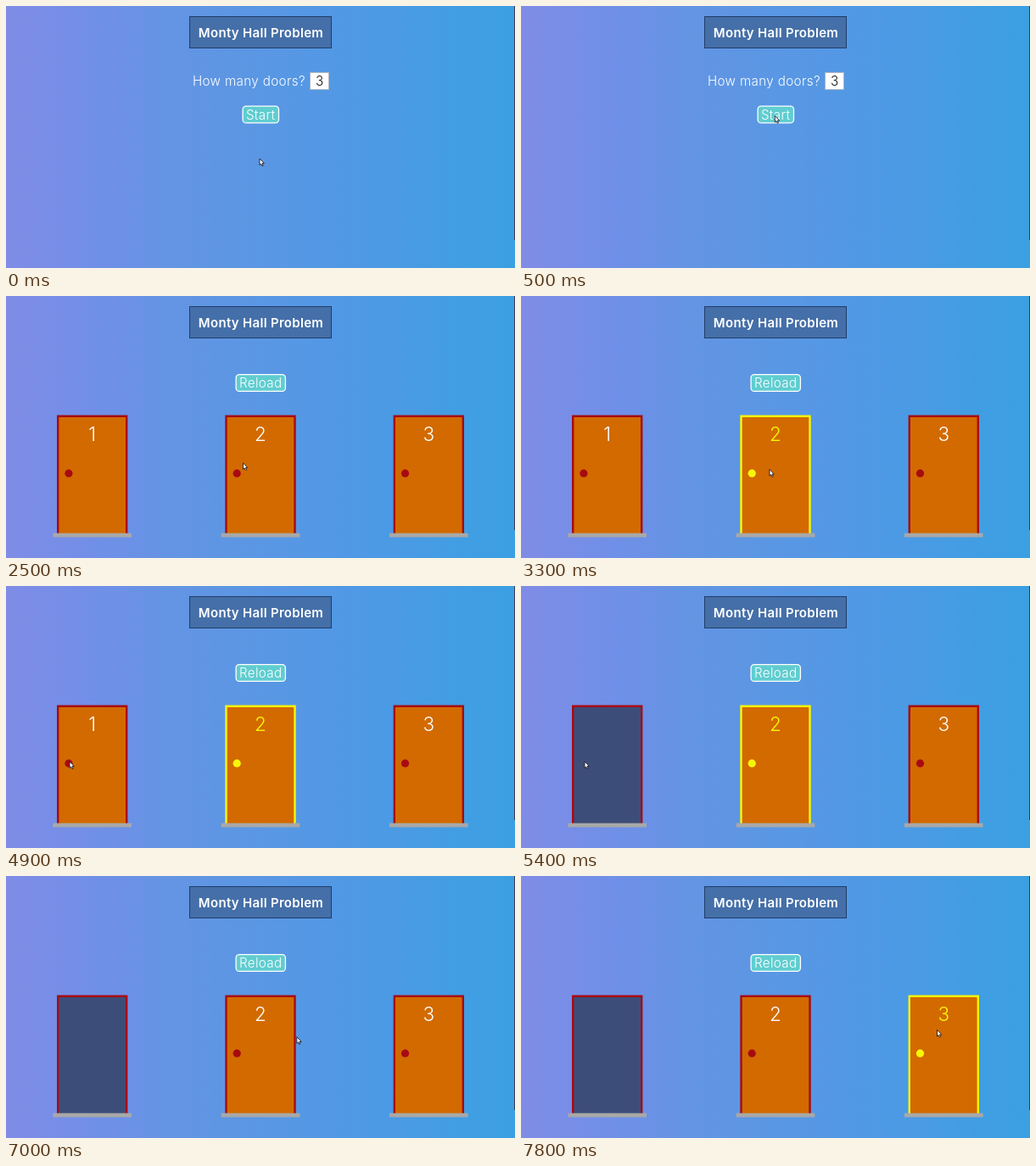
An HTML page that plays this animation: 600x309 px, repeating every 8 s.

```html
<!DOCTYPE html>
<html lang="en">
<head>
<meta charset="utf-8">
<title>Monty Hall Problem</title>
<style>
  html, body { margin: 0; width: 100%; height: 100%; overflow: hidden; }
  svg { display: block; width: 100vw; height: 100vh; }
  text { font: 300 15.2px Inter, sans-serif; letter-spacing: .35px; fill: #fff; text-anchor: middle; }
  .title { font-size: 15px; font-weight: 600; letter-spacing: .3px; }
  .button rect { fill: #60cdd0; stroke: #fff; stroke-width: 1.3; }
  .door { --accent: #a80a12; --ink: #fff; }
  .door.selected { --accent: #f8f808; --ink: #f8f808; }
  .panel { fill: #d26a00; stroke: var(--accent); stroke-width: 2.4; }
  .knob { fill: var(--accent); }
  .door text { font-size: 22.5px; letter-spacing: 0; fill: var(--ink); }
  .open .panel { fill: #3d4d79; }
  .open .knob, .open text { display: none; }
</style>
</head>
<body>
<svg viewBox="0 0 600 309" preserveAspectRatio="none">
  <defs>
    <linearGradient id="sky">
      <stop offset="0" stop-color="#808ce6"/>
      <stop offset=".17" stop-color="#718fe8"/>
      <stop offset=".35" stop-color="#6295e3"/>
      <stop offset=".7" stop-color="#4f99e5"/>
      <stop offset="1" stop-color="#3aa0e1"/>
    </linearGradient>
  </defs>
  <rect width="600" height="309" fill="url(#sky)"/>
  <rect x="599" width="1" height="276" fill="#3a3a58"/>
  <rect x="216.5" y="12.5" width="167" height="37" fill="#456fa8" stroke="#203d69"/>
  <text class="title" x="300.5" y="37">Monty Hall Problem</text>

  <g id="setup">
    <text x="286.4" y="94">How many doors?</text>
    <rect x="358.5" y="78.5" width="22" height="20" fill="#fff" stroke="#a9b4c4"/>
    <text x="369.7" y="94" style="fill:#111">3</text>
    <g class="button">
      <rect x="279.1" y="118.1" width="42.4" height="19.8" rx="4"/>
      <text x="300.2" y="133.5">Start</text>
    </g>
  </g>

  <g id="game">
    <g class="button">
      <rect x="271.1" y="92.6" width="58.3" height="19.8" rx="4"/>
      <text x="300.3" y="108">Reload</text>
    </g>
  </g>

  <path id="cursor" d="M0 0V7.6L1.7 6.1 3 8.8 4.2 8.2 3 5.6H5.3Z"
        fill="#fff" stroke="#1c1c24" stroke-width=".9"/>
</svg>

<script>
const LOOP = 8000, STEP = 100;
const START = 1100, PICK = 3300, REVEAL = 5300, UNPICK = 6900, SWITCH = 7700;
const DOOR_GAP = 198.3;

// Each move bends towards "via" and begins where the previous one ended.
const home = [299, 180];
const moves = [
  { from: 0, until: 500, via: [299, 155], to: [299.3, 129.5] },
  { from: 1800, until: 2700, via: [380, 120], to: [269, 205] },
  { from: 2700, until: 3000, via: [280, 208], to: [293, 204.5] },
  { from: 3600, until: 4500, via: [180, 125], to: [75, 207] },
  { from: 5700, until: 6600, via: [130, 212], to: [281.5, 189.5] },
  { from: 6900, until: 7500, via: [380, 192], to: [490.5, 181.5] }
];

const $ = id => document.getElementById(id);
const easeOut = u => 1 - (1 - u) ** 2;

function addDoor(number) {
  const center = 300 + (number - 2) * DOOR_GAP;
  const door = document.createElementNS("http://www.w3.org/2000/svg", "g");
  door.innerHTML = `
    <path class="panel" d="M${center - 40.5} 281V141.7H${center + 40.5}V281"/>
    <circle class="knob" cx="${center - 27.8}" cy="209.2" r="4.6"/>
    <text x="${center}" y="171.3">${number}</text>
    <rect x="${center - 46.3}" y="279.7" width="92.6" height="4.8" fill="#a8a8a8"/>`;
  $("game").append(door);
  return door;
}

const doors = [1, 2, 3].map(addDoor);

function pointerAt(t) {
  let position = home;
  for (const { from, until, via, to } of moves) {
    if (t < from) break;
    const s = easeOut(Math.min(1, (t - from) / (until - from)));
    position = position.map((start, axis) =>
      (1 - s) ** 2 * start + 2 * s * (1 - s) * via[axis] + s * s * to[axis]);
  }
  return position;
}

function show(id, visible) {
  $(id).style.display = visible ? "" : "none";
}

function setDoor(index, selected, open = false) {
  doors[index].setAttribute("class", `door${selected ? " selected" : ""}${open ? " open" : ""}`);
}

function draw(t) {
  show("setup", t < START);
  show("game", t >= START);
  setDoor(0, false, t >= REVEAL);
  setDoor(1, t >= PICK && t < UNPICK);
  setDoor(2, t >= SWITCH);
  $("cursor").setAttribute("transform", `translate(${pointerAt(t)})`);
}

function tick() {
  const t = performance.now() % LOOP;
  draw(Math.floor(t / STEP) * STEP);
  requestAnimationFrame(tick);
}
tick();
</script>
</body>
</html>
```
